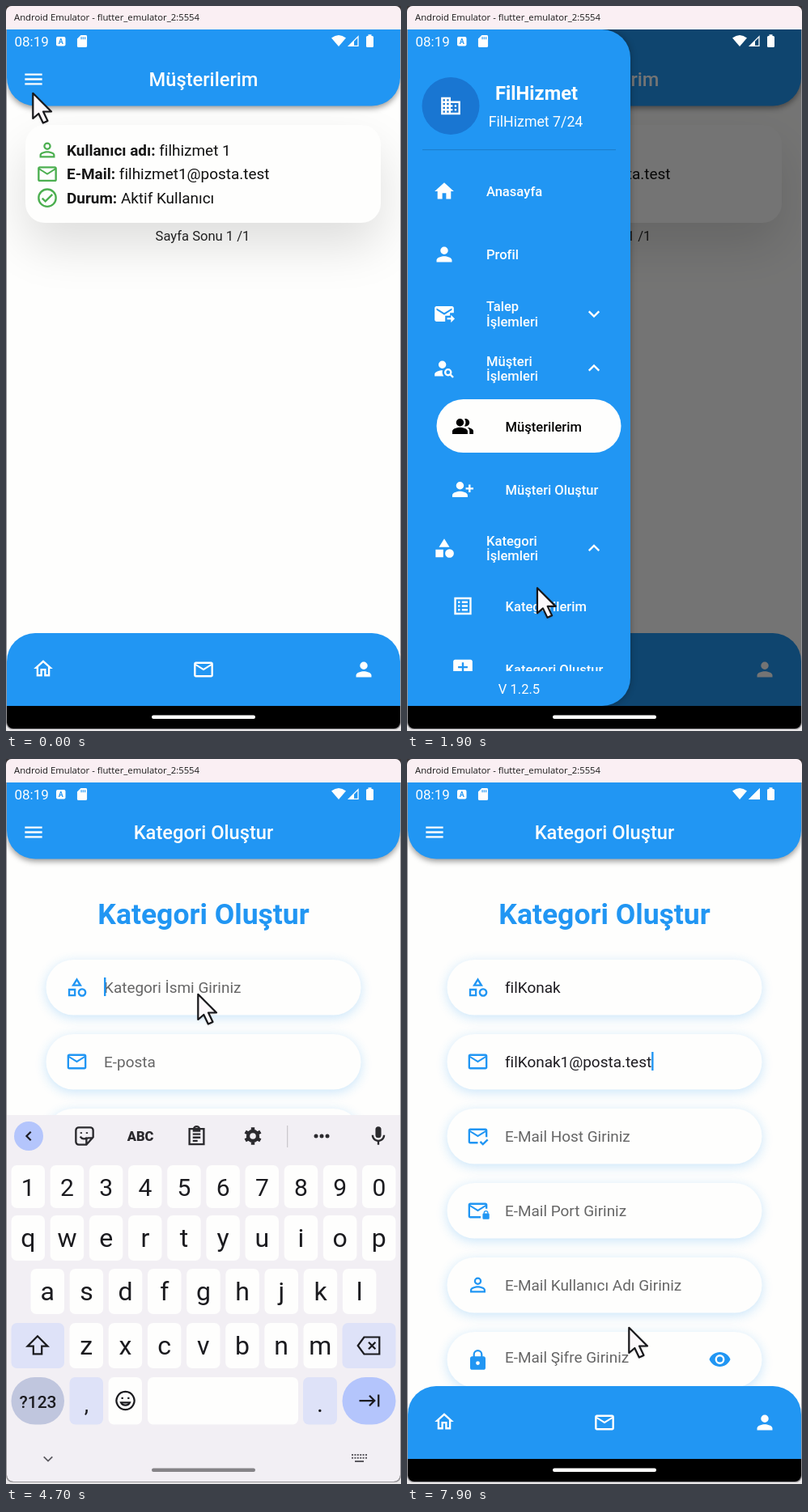
Recreate the animation shown at these times as an HTML page with a canvas. Size 488 by 896 pixels, loop 8 s.

```html
<!DOCTYPE html>
<html lang="tr">
<head>
<meta charset="utf-8">
<style>
html, body { margin: 0; width: 100%; height: 100%; overflow: hidden; background: #e9e7e8; }
canvas { display: block; width: 488px; height: 896px; }
</style>
</head>
<body>
<canvas id="stage"></canvas>
<script>
const LOOP = 8000, DP = 1.184;
const BLUE = '#2196f3', WHITE = '#fefefd', INK = '#1d1b20', GREEN = '#4caf50';
const canvas = document.getElementById('stage');
const ctx = canvas.getContext('2d');
const ratio = window.devicePixelRatio || 1;
canvas.width = 488 * ratio;
canvas.height = 896 * ratio;

// Filled icons on a 24-unit grid
const ICONS = {
  menu: 'M3 18h18v-2H3zm0-5h18v-2H3zm0-7v2h18V6z',
  homeLine: 'M12 5.69l5 4.5V18h-2v-6H9v6H7v-7.81zM12 3L2 12h3v8h6v-6h2v6h6v-8h3z',
  home: 'M10 20v-6h4v6h5v-8h3L12 3 2 12h3v8z',
  mail: 'M22 6c0-1.1-.9-2-2-2H4c-1.1 0-2 .9-2 2v12c0 1.1.9 2 2 2h16c1.1 0 2-.9 2-2zm-2 0l-8 5-8-5zm0 12H4V8l8 5 8-5z',
  mailCheck: 'M12 18H4V8l8 5 8-5v5h2V6c0-1.1-.9-2-2-2H4c-1.1 0-2 .9-2 2v12c0 1.1.9 2 2 2h8zM20 6l-8 5-8-5zM17.3 22l-3.5-3.5 1.4-1.4 2.1 2.1 4.3-4.2 1.4 1.4z',
  mailLock: 'M4 18V8l8 5 8-5v2h2V6c0-1.1-.9-2-2-2H4c-1.1 0-2 .9-2 2v12c0 1.1.9 2 2 2h11v-2zM20 6l-8 5-8-5zM23 15v-.5a2.5 2.5 0 0 0-5 0v.5a1 1 0 0 0-1 1v4a1 1 0 0 0 1 1h5a1 1 0 0 0 1-1v-4a1 1 0 0 0-1-1zm-1 0h-3v-.5a1.5 1.5 0 0 1 3 0z',
  mailSend: 'M20 4H4c-1.1 0-2 .9-2 2v12c0 1.1.9 2 2 2h9v-6h5v-3h4V6c0-1.1-.9-2-2-2zm0 4l-8 5-8-5V6l8 5 8-5zM19 13l4 4-4 4v-3h-4v-2h4z',
  person: 'M12 12a4 4 0 1 0 0-8 4 4 0 0 0 0 8zm0 2c-2.67 0-8 1.34-8 4v2h16v-2c0-2.66-5.33-4-8-4z',
  personLine: 'M12 5.9a2.1 2.1 0 1 1 0 4.2 2.1 2.1 0 0 1 0-4.2m0 9c2.97 0 6.1 1.46 6.1 2.1v1.1H5.9V17c0-.64 3.13-2.1 6.1-2.1M12 4a4 4 0 1 0 0 8 4 4 0 0 0 0-8zm0 9c-2.67 0-8 1.34-8 4v3h16v-3c0-2.66-5.33-4-8-4z',
  personFind: 'M10 12a4 4 0 1 0 0-8 4 4 0 0 0 0 8zM10.3 14C7.6 13.9 2 15.3 2 18v2h9.5c-2.4-2.8-1.2-5.9-1.2-6zM19.4 18c.4-.6.6-1.3.6-2a4 4 0 1 0-4 4c.7 0 1.4-.2 2-.6l2.6 2.6 1.4-1.4zM16 18a2 2 0 1 1 0-4 2 2 0 0 1 0 4z',
  personAdd: 'M9 12a4 4 0 1 0 0-8 4 4 0 0 0 0 8zm0 2c-2.67 0-8 1.34-8 4v2h16v-2c0-2.66-5.33-4-8-4zM20 10V7h-2v3h-3v2h3v3h2v-3h3v-2z',
  group: 'M16.7 13.1C18 14 19 15.3 19 17v3h4v-3c0-2.2-3.6-3.5-6.3-3.9zM15 12a4 4 0 1 0-1.3-7.8c1.7 2.2 1.7 5.3 0 7.6.4.1.8.2 1.3.2zM9 12a4 4 0 1 0 0-8 4 4 0 0 0 0 8zm0 1c-2.67 0-8 1.34-8 4v3h16v-3c0-2.66-5.33-4-8-4z',
  check: 'M12 2a10 10 0 1 0 0 20 10 10 0 0 0 0-20zm0 18a8 8 0 1 1 0-16 8 8 0 0 1 0 16zm4.6-12.4L10 14.2l-2.6-2.6L6 13l4 4 8-8z',
  shapes: 'M12 2l-5.5 9h11zM17.5 13a4.5 4.5 0 1 0 .01 0zM3 13.5h8v8H3z',
  shapesLine: 'M12 2l-5.5 9h11zm0 3.84L13.93 9h-3.87zM17.5 13a4.5 4.5 0 1 0 .01 0zm0 2a2.5 2.5 0 1 1-.01 0zM3 13.5h8v8H3zm2 2h4v4H5z',
  lock: 'M18 8h-1V6A5 5 0 0 0 7 6v2H6c-1.1 0-2 .9-2 2v10c0 1.1.9 2 2 2h12c1.1 0 2-.9 2-2V10c0-1.1-.9-2-2-2zm-6 9a2 2 0 1 1 0-4 2 2 0 0 1 0 4zm3.1-9H8.9V6a3.1 3.1 0 0 1 6.2 0z',
  eye: 'M12 4.5C7 4.5 2.73 7.61 1 12c1.73 4.39 6 7.5 11 7.5s9.27-3.11 11-7.5c-1.73-4.39-6-7.5-11-7.5zM12 17a5 5 0 1 1 0-10 5 5 0 0 1 0 10zm0-8a3 3 0 1 0 0 6 3 3 0 0 0 0-6z',
  office: 'M12 7V3H2v18h20V7zM6 19H4v-2h2zm0-4H4v-2h2zm0-4H4V9h2zm0-4H4V5h2zm4 12H8v-2h2zm0-4H8v-2h2zm0-4H8V9h2zm0-4H8V5h2zm10 12h-8v-2h2v-2h-2v-2h2v-2h-2V9h8zm-2-8h-2v2h2zm0 4h-2v2h2z',
  list: 'M3 3h18v18H3zm2 2v14h14V5zM11 7h6v2h-6zm0 4h6v2h-6zm0 4h6v2h-6zM7 7h2v2H7zm0 4h2v2H7zm0 4h2v2H7z',
  addNote: 'M22 4c0-1.1-.9-2-2-2H4c-1.1 0-2 .9-2 2v12c0 1.1.9 2 2 2h14l4 4zm-5 7h-4v4h-2v-4H7V9h4V5h2v4h4z',
  logout: 'M17 7l-1.4 1.4 2.6 2.6H8v2h10.2l-2.6 2.6L17 17l5-5zM4 5h8V3H4c-1.1 0-2 .9-2 2v14c0 1.1.9 2 2 2h8v-2H4z',
  mic: 'M12 14a3 3 0 0 0 3-3V5a3 3 0 0 0-6 0v6a3 3 0 0 0 3 3zm5-3a5 5 0 0 1-10 0H5c0 3.5 2.6 6.4 6 6.9V21h2v-3.1c3.4-.5 6-3.4 6-6.9z',
  card: 'M18 2h-8L4 8v12c0 1.1.9 2 2 2h12c1.1 0 2-.9 2-2V4c0-1.1-.9-2-2-2zM10 5h1.5v4H10zm3 0h1.5v4H13zm3 0h1.5v4H16z',
};
// Stroked icons on the same grid
const LINES = {
  chevron: 'M6.7 9.3L12 14.6l5.3-5.3',
  sticker: 'M21 13V6a3 3 0 0 0-3-3H6a3 3 0 0 0-3 3v12a3 3 0 0 0 3 3h8zM14 21v-5a2 2 0 0 1 2-2h5M8.5 8v1.5M14.5 8v1.5M7.5 12.5c2 3 5 3 7 1',
  clipboard: 'M4.5 4.5h15v16h-15zM8 10h8M8 13.5h8M8 17h5M9 5a3 3 0 0 1 6 0v1.5H9z',
  shift: 'M12 3L2.5 12.5H8V20h8v-7.5h5.5z',
  erase: 'M8 4.5h13.5v15H8L2.5 12zM12 9l6 6M18 9l-6 6',
  tab: 'M2 12h15M12 7l5 5-5 5M21 6v12',
  smile: 'M12 2.8a9.2 9.2 0 1 0 .01 0zM7.5 14c1.5 3.6 7.5 3.6 9 0zM8.8 8.4v2M15.2 8.4v2',
};

const clamp = v => Math.max(0, Math.min(1, v));
const progress = (t, start, length) => clamp((t - start) / length);
const easeOut = p => 1 - (1 - p) ** 3;
const smooth = p => p * p * (3 - 2 * p);
const valueAt = (steps, t) => steps.reduce((v, [start, next]) => t >= start ? next : v, '');

function text(str, x, y, size, color = WHITE, weight = 400, align = 'left', family = 'Roboto') {
  ctx.font = `${weight} ${size}px ${family}, sans-serif`;
  ctx.textAlign = align;
  ctx.fillStyle = color;
  ctx.fillText(str, x, y);
  return ctx.measureText(str).width;
}
function box(x, y, w, h, r, color) {
  ctx.fillStyle = color;
  ctx.beginPath();
  ctx.roundRect(x, y, w, h, r);
  ctx.fill();
}
function disc(x, y, r, color) {
  ctx.fillStyle = color;
  ctx.beginPath();
  ctx.arc(x, y, r, 0, 7);
  ctx.fill();
}
function group(draw) { ctx.save(); draw(); ctx.restore(); }
function clipTo(x, y, w, h, r = 0) { ctx.beginPath(); ctx.roundRect(x, y, w, h, r); ctx.clip(); }
function shadow(color, blur, dy) {
  ctx.shadowColor = color;
  ctx.shadowBlur = blur * ratio;
  ctx.shadowOffsetY = dy * ratio;
}
function icon(name, x, y, color = WHITE, scale = DP) {
  group(() => {
    ctx.translate(x - 12 * scale, y - 12 * scale);
    ctx.scale(scale, scale);
    ctx.fillStyle = color;
    ctx.fill(new Path2D(ICONS[name]), 'evenodd');
  });
}
function lineIcon(name, x, y, color, scale = DP, turn = 0, width = 2) {
  group(() => {
    ctx.translate(x, y);
    ctx.rotate(turn);
    ctx.scale(scale, scale);
    ctx.translate(-12, -12);
    ctx.strokeStyle = color;
    ctx.lineWidth = width;
    ctx.stroke(new Path2D(LINES[name]));
  });
}

function bars(title) {
  group(() => {
    shadow('rgba(0,0,0,.4)', 7, 3);
    box(1, 0, 486, 123.5, [0, 0, 35, 35], BLUE);
  });
  icon('menu', 34, 90.5);
  text(title, 244, 99, 20 * DP, WHITE, 500, 'center');
  box(1, 775, 486, 91, [35, 35, 0, 0], BLUE);
  icon('homeLine', 46, 819);
  icon('mail', 244, 820);
  icon('person', 442, 820);
}

function customersPage() {
  ctx.fillStyle = WHITE;
  ctx.fillRect(0, 0, 488, 896);
  group(() => {
    shadow('rgba(0,0,0,.13)', 60, 28);
    box(24, 147, 439, 121, 24, WHITE);
  });
  const rows = [['personLine', 'Kullanıcı adı:', 'filhizmet 1'], ['mail', 'E-Mail:', 'filhizmet1@posta.test'], ['check', 'Durum:', 'Aktif Kullanıcı']];
  rows.forEach(([name, label, value], i) => {
    const y = 178 + i * 29.6;
    icon(name, 51, y, GREEN);
    const w = text(label + ' ', 75, y + 6.7, 16 * DP, '#161616', 700);
    text(value, 75 + w, y + 6.7, 16 * DP, '#111');
  });
  text('Sayfa Sonu 1 /1', 243, 290, 14 * DP, '#222', 400, 'center');
  bars('Müşterilerim');
}

const NAME_STEPS = [[4800, 'f'], [4900, 'filK'], [5000, 'filKona'], [5100, 'filKonak']];
const MAIL_STEPS = [
  [5500, 'fi'], [5600, 'filko'], [5700, 'filkona'], [5800, 'filkonak'],
  [6000, 'filko'], [6100, 'fil'], [6200, 'filKon'], [6300, 'filKona'], [6400, 'filKonak'],
  [6900, 'filKonak1'], [7300, 'filKonak1@'], [7400, 'filKonak1@pos'], [7500, 'filKonak1@posta.test'],
];
const FIELDS = [
  ['shapesLine', 'Kategori İsmi Giriniz'], ['mail', 'E-posta'], ['mailCheck', 'E-Mail Host Giriniz'],
  ['mailLock', 'E-Mail Port Giriniz'], ['personLine', 'E-Mail Kullanıcı Adı Giriniz'], ['lock', 'E-Mail Şifre Giriniz'],
];

function formPage(t) {
  ctx.fillStyle = WHITE;
  ctx.fillRect(0, 0, 488, 896);
  text('Kategori Oluştur', 244, 204, 30 * DP, BLUE, 700, 'center');
  const values = [valueAt(NAME_STEPS, t), valueAt(MAIL_STEPS, t)];
  const focus = t < 4200 ? -1 : t < 5200 ? 0 : 1;
  const caretOn = !(t >= 6600 && t < 6900) && !(t >= 7100 && t < 7300);
  FIELDS.forEach(([name, hint], i) => {
    const top = 248 + i * 92, mid = top + 34, value = values[i];
    group(() => {
      shadow('rgba(33,150,243,.24)', 14, 3);
      box(49.5, top, 389, 68.5, 34, WHITE);
    });
    icon(name, 87.5, mid + (i === 5 ? 1 : 0), BLUE);
    const baseline = mid + (i === 5 ? 3.8 : 6.5);
    let w = text(value || hint, 121, baseline, 16 * DP, value ? INK : '#666');
    if (!value) w = 0;
    if (i !== focus) return;
    if (value && t < 7500) box(121, baseline + 2, w, 1.2, 0, INK);
    if (caretOn) box(121 + w, mid - 12, 2.4, 23, 0, BLUE);
  });
  icon('eye', 386.5, 742, BLUE);
  bars('Kategori Oluştur');
}

function menuRow(name, lines, y, sub, color = WHITE) {
  icon(name, sub ? 69 : 46, y, color);
  const words = [].concat(lines);
  words.forEach((line, i) =>
    text(line, sub ? 121.5 : 98, y + 6 + (i - (words.length - 1) / 2) * 18.7, 14 * DP, color, 500));
}

function drawer(t) {
  const open = easeOut(progress(t, 100, 400));
  if (!open) return;
  const unfold = smooth(progress(t, 1400, 300));
  ctx.fillStyle = `rgba(0,0,0,${.54 * open})`;
  ctx.fillRect(0, 0, 488, 896);
  ctx.translate((open - 1) * 290, 0);
  group(() => {
    shadow('rgba(0,0,0,.3)', 8, 0);
    box(0, 29, 276, 836, [0, 35, 35, 0], BLUE);
  });
  disc(54, 123.5, 35.5, '#1976d2');
  icon('office', 54, 123.5);
  text('FilHizmet', 160, 116, 20 * DP, WHITE, 700, 'center');
  text('FilHizmet 7/24', 159, 149, 15 * DP, WHITE, 400, 'center');
  box(19, 177, 239, 1.2, 0, '#1c80d0');

  const press = progress(t, 2600, 200);
  if (press) group(() => {
    clipTo(0, 180, 276, 654);
    box(37, 786, 227.5, 66, 33, `rgba(160,170,180,${.25 * press})`);
    disc(175, 814, 15 * press, 'rgba(190,190,190,.4)');
  });
  group(() => {
    clipTo(0, 180, 276, 642);
    menuRow('home', 'Anasayfa', 229);
    menuRow('person', 'Profil', 307);
    menuRow('mailSend', ['Talep', 'İşlemleri'], 380.5);
    menuRow('personFind', ['Müşteri', 'İşlemleri'], 448);
    box(36.5, 486, 228, 66, 33, WHITE);
    menuRow('group', 'Müşterilerim', 519.5, true, '#000');
    menuRow('personAdd', 'Müşteri Oluştur', 597.5, true);
    menuRow('shapes', ['Kategori', 'İşlemleri'], 671 - unfold);
    menuRow('logout', 'Çıkış Yap', 744 + 156 * unfold);
    lineIcon('chevron', 231, 380.5, WHITE);
    lineIcon('chevron', 231, 447.5, WHITE, DP, Math.PI);
    lineIcon('chevron', 231, 671 - unfold, WHITE, DP, Math.PI * unfold);
    clipTo(0, 705, 276, 156 * unfold);
    menuRow('list', 'Kategorilerim', 741.5, true);
    menuRow('addNote', 'Kategori Oluştur', 819.5, true);
  });
  text('V 1.2.5', 138.5, 849.5, 14 * DP, WHITE, 400, 'center');
}

function statusBar(t) {
  text('08:19', 10.5, 50, 17, WHITE);
  box(62, 38, 11.5, 11.5, 2, WHITE);
  text('A', 67.8, 47.2, 9, BLUE, 700, 'center');
  icon('card', 94, 43.5, WHITE, .76);
  ctx.fillStyle = ctx.strokeStyle = WHITE;
  ctx.fill(new Path2D('M411 50L402 39.5q9-7 18 0z'));
  ctx.lineWidth = 1.3;
  ctx.stroke(new Path2D('M423.5 49.3H435V37.8z'));
  ctx.fill(new Path2D(t < 7300 ? 'M423 50h7v-7z' : 'M422 50h14V36z'));
  box(445, 37, 9, 14, 1.5, WHITE);
  box(447.5, 35.3, 4, 3, 0, WHITE);
}

function gear(x, y) {
  ctx.strokeStyle = '#2b2a2e';
  ctx.lineWidth = 4.4;
  ctx.beginPath();
  ctx.arc(x, y, 6, 0, 7);
  for (let i = 0; i < 6; i++) {
    const a = i * Math.PI / 3 + Math.PI / 6;
    ctx.moveTo(x + 6 * Math.cos(a), y + 6 * Math.sin(a));
    ctx.lineTo(x + 10.8 * Math.cos(a), y + 10.8 * Math.sin(a));
  }
  ctx.stroke();
}

function keyRow(keys, x, y, h, size) {
  [...keys].forEach((key, i) => {
    const left = x + i * 48.17;
    box(left, y, 41.5, h, 7, WHITE);
    text(key, left + 20.8, y + h / 2 + 11, size, '#1b1b1f', 400, 'center');
  });
}

function toolbar(t) {
  const dark = '#2b2a2e', typing = t >= 4800, mailFocus = t >= 5200;
  disc(28, 466, 18, '#b4c5fc');
  lineIcon('chevron', 28, 466, INK, 1, typing ? -Math.PI / 2 : Math.PI / 2, 2.2);
  if (typing) {
    text(valueAt(mailFocus ? MAIL_STEPS : NAME_STEPS, t), 243, 474.5, 21, '#2b2a2e', 400, 'center');
  } else {
    lineIcon('sticker', 97, 466, dark);
    text('ABC', 166, 472, 16.5, dark, 900, 'center');
    lineIcon('clipboard', 235.5, 466, dark);
    gear(305, 466);
    box(347, 453, 1.3, 27, 0, '#cbc8ce');
    for (const x of [383, 390, 397]) disc(x, 466, 2.5, dark);
  }
  icon('mic', 460, 466, dark);
  if (!mailFocus) return;
  for (const [dx, color] of [[1.5, '#f2eff4'], [0, dark]]) {
    ctx.strokeStyle = color;
    ctx.lineWidth = 2.4;
    ctx.beginPath();
    ctx.moveTo(449 + dx, 456 - dx);
    ctx.lineTo(470 + dx, 477 - dx);
    ctx.stroke();
  }
}

function keyboard(t) {
  const up = easeOut(progress(t, 4200, 400)) * (1 - smooth(progress(t, 7500, 400)));
  if (!up) return;
  const pale = '#dee2f8', dark = '#1b1b1f';
  ctx.translate(0, (1 - up) * 453);
  box(1, 440, 486, 453, 0, '#f2eff4');
  toolbar(t);
  keyRow('1234567890', 6.5, 502, 53, 30);
  keyRow('qwertyuiop', 6.5, 564, 56, 32);
  keyRow('asdfghjkl', 30.5, 630, 56, 32);
  keyRow('zxcvbnm', 78.5, 697, 56, 32);
  box(6.5, 697, 65.5, 56, 7, pale);
  lineIcon('shift', 39, 725, dark, 1.3, 0, 1.7);
  box(415.5, 697, 66, 56, 7, pale);
  lineIcon('erase', 448, 725, dark, 1.4, 0, 1.6);
  box(6.5, 764, 65.5, 58.5, 29, '#c0c6de');
  text('?123', 39.5, 802, 21, dark, 500, 'center');
  box(78.5, 764, 41.5, 58.5, 7, pale);
  if (t < 5200) text(',', 99.5, 807, 27, dark, 400, 'center');
  else text('@', 99.3, 802, 24, dark, 400, 'center');
  box(126.5, 764, 41.5, 58.5, 7, WHITE);
  lineIcon('smile', 147.5, 793, dark, 1.2, 0, 1.9);
  box(175, 764, 186, 58.5, 7, WHITE);
  box(367, 764, 42, 58.5, 7, pale);
  text('.', 388, 807, 30, dark, 400, 'center');
  box(415.5, 764, 66, 58.5, 29, '#b4c5fc');
  lineIcon('tab', 449, 793, dark, 1.25, 0, 1.8);
  lineIcon('chevron', 52, 865, '#5c5a60', 1, 0, 1.8);
  for (let i = 0; i < 12; i++) box(427 + i % 6 * 3.4, 859 + Math.floor(i / 6) * 3.8, 2, 2, 0, '#5c5a60');
  box(431, 867, 11, 2, 0, '#5c5a60');
  box(180, 876.5, 128, 4.5, 2.2, '#858387');
}

// time, x, y of the pointer tip
const PATH = [
  [0, 32, 106], [200, 34, 92], [400, 34, 92], [900, 148, 640], [1100, 151, 654], [1600, 151, 654],
  [2300, 173, 815], [2400, 174, 817], [3000, 174, 817], [3600, 323, 403], [3800, 232, 316],
  [3900, 236, 289], [5000, 236, 289], [5300, 168, 401], [7400, 168, 401], [7900, 273, 701],
];
function pointer(t) {
  const next = Math.max(1, PATH.findIndex(p => p[0] >= t));
  const [t0, x0, y0] = PATH[next - 1], [t1, x1, y1] = PATH[next];
  const p = smooth(progress(t, t0, t1 - t0));
  ctx.translate(x0 + (x1 - x0) * p, y0 + (y1 - y0) * p);
  const arrow = new Path2D('M1.3 1.8V33l7-6 5.5 11.5 5.7-2.5-5.5-11.5h10z');
  ctx.lineJoin = 'round';
  ctx.fillStyle = '#fcf8fa';
  ctx.strokeStyle = '#17171a';
  ctx.lineWidth = 2.2;
  group(() => { shadow('rgba(0,0,0,.3)', 3, 1); ctx.fill(arrow); });
  ctx.stroke(arrow);
}

function screen(t) {
  clipTo(1, 29, 486, 864, [0, 0, 8, 8]);
  group(() => {
    clipTo(1, 29, 486, 836);
    const enter = progress(t, 2900, 300);
    if (enter < 1) {
      customersPage();
      group(() => drawer(t));
    }
    if (enter) group(() => {
      const scale = .85 + .15 * easeOut(enter);
      ctx.globalAlpha = clamp(enter * 1.6);
      ctx.translate(244, 447);
      ctx.scale(scale, scale);
      ctx.translate(-244, -447);
      formPage(t);
    });
  });
  statusBar(t);
  box(1, 865, 486, 28, 0, '#000');
  box(180, 876.5, 128, 4.5, 2.2, WHITE);
  group(() => keyboard(t));
}

function render(now) {
  const t = Math.floor(now % LOOP / 100) * 100;
  ctx.setTransform(ratio, 0, 0, ratio, 0, 0);
  box(0, 0, 488, 896, 0, '#e9e7e8');
  box(0, 0, 488, 20, 0, '#3a3638');
  box(0, 0, 488, 894, 8, '#98969a');
  box(0, 0, 488, 29, [7, 7, 0, 0], '#faeff3');
  text('Android Emulator - flutter_emulator_2:5554', 10, 18, 11.3, '#1a1a1a', 400, 'left', "'Open Sans'");
  group(() => screen(t));
  group(() => pointer(t));
}

const start = performance.now();
function tick() {
  render(performance.now() - start);
  requestAnimationFrame(tick);
}
tick();
</script>
</body>
</html>
```
